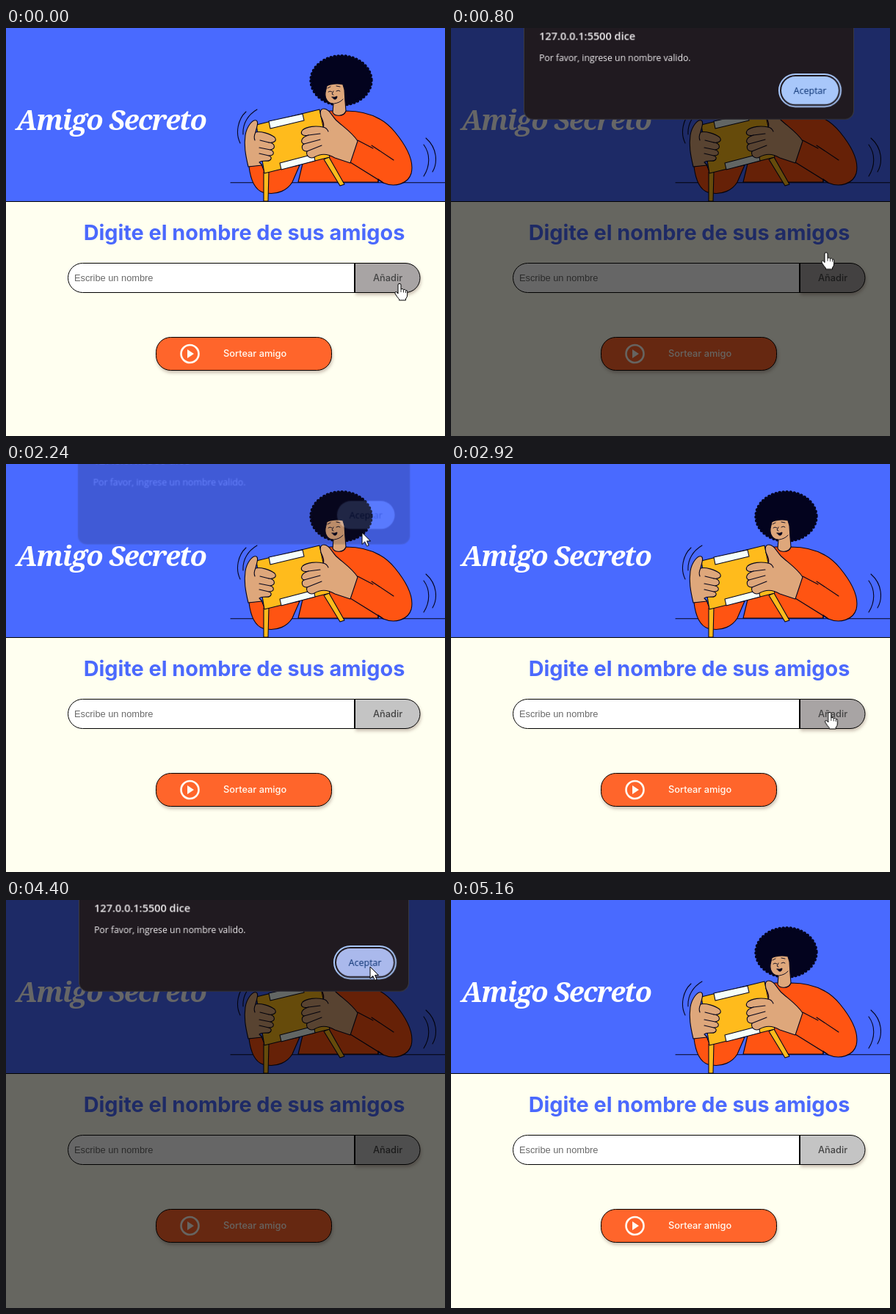
These frames come from a looping animation (598x556 px, 5.2 s). An HTML page:

```html
<!DOCTYPE html>
<html lang="es">
<head>
<meta charset="utf-8">
<title>Amigo Secreto</title>
<style>
html, body { margin: 0; width: 100%; height: 100%; overflow: hidden; background: #fffff0; }
svg { display: block; }
.ink { stroke: #05051c; stroke-width: 1.1; stroke-linejoin: round; stroke-linecap: round; }
.line { fill: none; }
.skin { fill: #dea77b; }
.orange { fill: #ff5412; }
.yellow { fill: #ffbb1c; }
.title { font: italic 700 38px "Noto Serif", serif; letter-spacing: -1.4px; fill: #fff; }
.heading { font: 700 28.8px Inter, sans-serif; fill: #4b69fd; text-anchor: middle; }
.label { font: 450 12.8px Inter, sans-serif; }
.hint { font: 12.8px "Liberation Sans", Arial, sans-serif; fill: #6a6a6a; }
.ui { font-family: "Open Sans", "Noto Sans", sans-serif; fill: #f0eef0; }
.shadow { filter: drop-shadow(1px 3px 2px rgba(70, 30, 20, .28)); }

#add, #veil, #dialog, #accept, #ring, #cursor, #hand, #arrow {
  animation: 5200ms linear infinite;
}
#cursor { animation-name: move; }
#veil { animation-name: veil; }
#dialog { animation-name: dialog; transform-origin: 324px 62px; }
#add { animation-name: add; animation-timing-function: step-end; }
#accept { animation-name: accept; animation-timing-function: step-end; }
#ring { animation-name: ring; animation-timing-function: step-end; }
#hand { animation-name: hand; animation-timing-function: step-end; }
#arrow { animation-name: arrow; animation-timing-function: step-end; }

@keyframes move {
  0% { transform: translate(536px, 348px); }
  10.77% { transform: translate(526px, 346px); }
  12.31% { transform: translate(520px, 343px); }
  15.385% { transform: translate(511px, 306px); }
  19.23% { transform: translate(506px, 220px); }
  28.46% { transform: translate(494px, 121px); }
  34.6% { transform: translate(488px, 96px); }
  43.08% { transform: translate(485px, 93px); }
  51.92% { transform: translate(515px, 338px); }
  63.85% { transform: translate(517px, 338px); }
  66.92% { transform: translate(515px, 300px); }
  75% { transform: translate(500px, 130px); }
  80.77%, 86.15% { transform: translate(496px, 91px); }
  91.54%, 100% { transform: translate(612px, 140px); }
}
@keyframes hand {
  0%, 50.8% { opacity: 1; }
  17.3%, 66.15%, 100% { opacity: 0; }
}
@keyframes arrow {
  0%, 50.8% { opacity: 0; }
  17.3%, 66.15%, 100% { opacity: 1; }
}
@keyframes add {
  0%, 50.8% { fill: #a8a4a4; }
  17.3%, 66.15%, 100% { fill: #c4c4c4; }
}
@keyframes accept {
  0%, 42.31%, 100% { fill: #a8c7fa; }
  34.6%, 79.8% { fill: #aab9ec; }
}
@keyframes ring {
  0%, 60% { opacity: 1; }
  42.31%, 85.38%, 100% { opacity: 0; }
}
@keyframes veil {
  0%, 12.31%, 42.88%, 60.77%, 85.96%, 100% { opacity: 0; }
  13.85%, 42.31%, 62.31%, 85.38% { opacity: 1; }
}
@keyframes dialog {
  0%, 12.31%, 43.4%, 60.77%, 86.47%, 100% { opacity: 0; transform: translateY(-20px) scale(1.009); }
  14.62%, 42.31%, 63.08%, 85.38% { opacity: 1; transform: none; }
  43.08%, 86.15% { opacity: .19; transform: translateY(-15.5px) scale(1.007); }
}
</style>
</head>
<body>
<svg width="598" height="556" viewBox="0 0 598 556">
  <rect width="598" height="556" fill="#fffff0"/>
  <rect width="598" height="236" fill="#496aff"/>
  <path d="M0 236.5H598" stroke="#000"/>
  <text class="title" x="14" y="139">Amigo Secreto</text>

  <!-- illustration -->
  <g class="ink">
    <path class="line" d="M306 210.8H598"/>
    <path class="line" d="M319 157C312 143 316 124 327 114M323 145C322 130 330 118 342 111M569 159C578 171 578 188 569 202M572 150C588 164 588 184 581 196"/>
    <ellipse cx="456.500" cy="71.500" rx="40.700" ry="33" fill="#03031e" stroke="#03031e" stroke-width="5" stroke-dasharray="0 5"/>
    <path class="orange" d="M398 210L410 160L428 118C434 112 440 113 446 113C450 121 460 121 463 113C490 113 514 122 530 142C548 164 556 182 552 198C548 212 530 218 514 211L507 206V210Z"/>
    <path class="skin" d="M437 79C441 76 452 75 459 77L461 84L462 100L463 113C460 121 448 121 445 115L446 103C439 103 434 97 435 88Z"/>
    <path class="line" stroke-width=".9" d="M439 87Q441 85 444 87M450 86Q453 84 455 86M438 82L442 80M450 79L455 80M446 86L444 90L446 91M447 103Q455 102 459 97"/>
    <path d="M444 94Q448 95 451 93Q451 98 447 97Z" fill="#05051c" stroke-width=".8"/>
    <path class="line" d="M507 210V206M469 183L514 211M479 153L500 164M498 160L528 180"/>
    <path class="orange" d="M331 189C333 205 338 220 350 224C370 229 384 220 390 210L400 187L352 196L348 186Z"/>
    <path class="yellow" d="M351 196H358L357 236H351ZM433 179L440 176L461 213L455 215Z"/>
    <path class="yellow" d="M341 132L427 111L441 176L352 198Z"/>
    <path fill="#f6fffa" d="M358 127L404 117L406 126L360 137ZM373 184L419 172L421 181L375 193Z"/>
    <path class="skin" d="M330 189C326 172 324 160 326 146C328 134 336 124 341 126C345 128 341 136 340 142C346 140 360 144 366 149C370 154 364 157 358 156C367 157 368 165 360 166C366 168 366 174 358 174C364 176 361 182 354 181C350 181 347 181 345 183L349 187Z"/>
    <path class="line" d="M358 156L346 153M360 166L345 163M358 174L345 171M340 142Q337 148 339 153"/>
    <path class="skin" d="M479 154C472 143 460 135 450 126C444 120 440 110 433 110C426 110 428 120 431 125C433 130 434 133 432 135C422 133 410 134 404 139C400 144 404 148 412 146C402 149 400 156 406 158C402 160 402 168 410 168C408 174 414 179 420 176C430 170 440 172 448 177L469 184Z"/>
    <path class="line" d="M412 146L428 144M406 158L428 152M410 168L430 160M432 135Q437 136 439 141"/>
  </g>

  <!-- form -->
  <text class="heading" x="324.500" y="288.700">Digite el nombre de sus amigos</text>
  <path class="shadow" id="add" d="M475.500 320.500H544A20 20 0 0 1 544 360.500H475.500Z" stroke="#000"/>
  <path d="M475 320.500H104.500A20 20 0 0 0 104.500 360.500H475Z" fill="#fff" stroke="#000"/>
  <path d="M475 320V361" stroke="#000" stroke-width="2"/>
  <text class="hint" x="93" y="345">Escribe un nombre</text>
  <text class="label" x="500" y="345" fill="#444">Añadir</text>
  <rect class="shadow" x="204.500" y="421.500" width="239" height="45" rx="20" fill="#ff652b" stroke="#000"/>
  <circle cx="250.500" cy="444" r="12" fill="none" stroke="#fffaf2" stroke-width="2.600"/>
  <path d="M247 438V450L256 444Z" fill="#fffaf2"/>
  <text class="label" x="296" y="448" fill="#fffaf2">Sortear amigo</text>

  <rect id="veil" width="598" height="556" fill="rgba(0,0,0,.6)"/>

  <g id="dialog">
    <rect x="99.500" y="-60" width="449" height="184.500" rx="12" fill="#201a20" stroke="#3b3b40"/>
    <text class="ui" x="120" y="16" font-size="14.500" font-weight="600">127.0.0.1:5500 dice</text>
    <text class="ui" x="120" y="45" font-size="12.200">Por favor, ingrese un nombre valido.</text>
    <rect id="ring" x="447" y="63" width="84" height="44" rx="22" fill="none" stroke="#a8c7fa" stroke-width="2"/>
    <rect id="accept" x="450" y="66" width="78" height="38" rx="19"/>
    <text class="ui" x="489" y="90" font-size="12.400" font-weight="500" text-anchor="middle" style="fill:#062e6f">Aceptar</text>
  </g>

  <g id="cursor" fill="#fff" stroke="#000" stroke-linejoin="round">
    <path id="arrow" d="M0 0V16L3.800 12.500L6.500 18.500L9.200 17.300L6.600 11.500H11.500Z"/>
    <g id="hand">
      <path d="M-2 2Q-2 .3 0 .3Q2 .3 2 2V8Q4 6.500 5.500 8.500Q7.500 7.500 8.500 9.500Q10.700 9 10.700 11.500V16Q10.500 19 8.500 21V23H-.5V21.500Q-3 19 -6 14Q-7 11.500 -4.500 11.500Q-3 12 -2 14Z"/>
      <path d="M2 8V12M5.500 9V12.500M8.500 10V13" fill="none" stroke-width=".8"/>
    </g>
  </g>
</svg>
</body>
</html>
```
